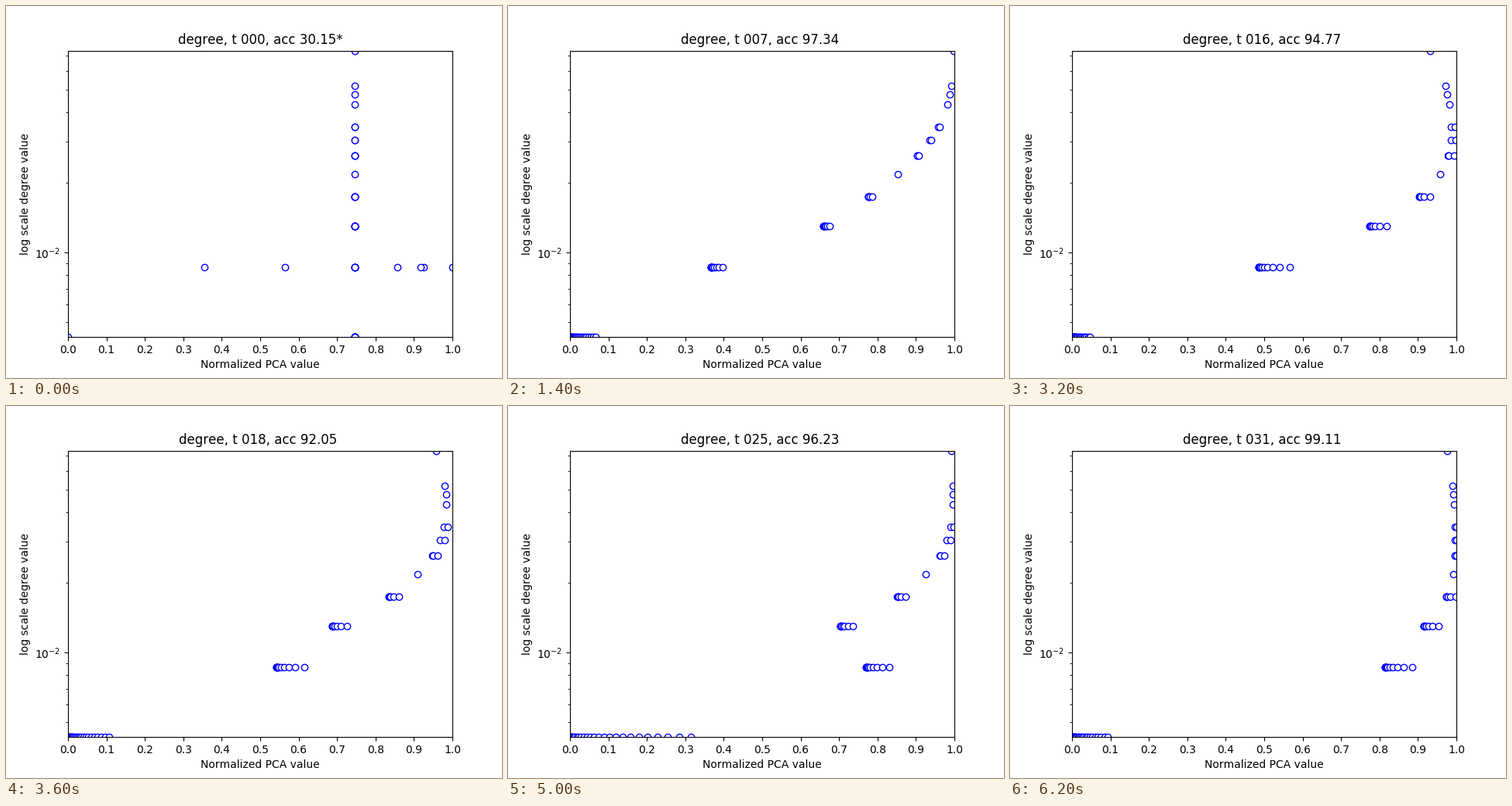
Recreate the animation shown at these times as a matplotlib script. Size 640 px wide and 480 px high, loop 6400 ms.

```python
from collections import namedtuple

import matplotlib.pyplot as plt
import numpy as np
from matplotlib.animation import FuncAnimation

FRAMES = 32
INTERVAL = 200
NODES = 232
MAX_DEGREE = 17
START = 0.745
START_OUTLIERS = [.354, .565, .857, 1.0, .926, .917]

# How many nodes to draw for each degree.
COUNTS = {1: 30, 2: 12, 3: 9, 4: 6, 5: 1, 6: 3, 7: 2, 8: 2,
          10: 1, 11: 1, 12: 1, 17: 1}

# pair: where degree 2 sits; gap: distance of degree 3 from the right edge,
# shrinking by `decay` per degree; fold: how far the hubs bend back;
# spread and leaf: width of the inner rows and of the degree 1 row.
Pose = namedtuple("Pose", "epoch accuracy pair gap decay fold spread leaf")
POSES = [
    Pose(7, 97.34, .367, .340, .66, 0, .03, .067),
    Pose(12, 95.63, .444, .171, .44, .032, .08, .052),
    Pose(16, 94.77, .486, .224, .42, .069, .08, .046),
    Pose(21, 87.96, .627, .445, .60, 0, .06, .198),
    Pose(25, 96.23, .771, .296, .50, .008, .06, .315),
    Pose(31, 99.11, .815, .085, .30, .024, .07, .093),
]
EPOCHS = [0] + [p.epoch for p in POSES]
ACCURACY = [30.15] + [p.accuracy for p in POSES]

degrees = np.repeat(list(COUNTS), list(COUNTS.values()))
rank = np.concatenate([np.linspace(0, 1, n) for n in COUNTS.values()])


def place(pose):
    """Each row is dense at its left end and thins out to the right."""
    hubs = (1 - pose.gap * pose.decay ** (degrees - 3.0)
            - pose.fold * (degrees / MAX_DEGREE) ** 2.5)
    base = np.select([degrees == 1, degrees == 2], [0, pose.pair], hubs)
    inner = pose.spread * (2 / degrees) ** 1.5 * rank ** 4
    tail = np.where(degrees == 1, pose.leaf * rank ** 3, inner)
    return np.minimum(base + tail, 1)


def starting_positions():
    x = np.full(len(degrees), START)
    x[0] = 0
    x[np.flatnonzero(degrees == 2)[-len(START_OUTLIERS):]] = START_OUTLIERS
    return x


positions = np.array([starting_positions()] + [place(p) for p in POSES])

plt.rcParams["text.kerning_factor"] = 6
fig, ax = plt.subplots(figsize=(6.4, 4.8), dpi=100)
ax.set_yscale("log")
ax.set_xlim(0, 1)
ax.set_ylim(1 / (NODES - 1), MAX_DEGREE / (NODES - 1))
ax.set_xticks(np.linspace(0, 1, 11))
ax.set_xlabel("Normalized PCA value")
ax.set_ylabel("log scale degree value")
title = ax.set_title("")
points, = ax.plot([], [], "o", markerfacecolor="white", markeredgecolor="blue")


def training_time(epoch):
    """Progress is fastest in the first epochs."""
    first = EPOCHS[1]
    if epoch >= first:
        return epoch
    return first * (1 - (1 - epoch / first) ** 2)


def update(epoch):
    t = training_time(epoch)
    x = [np.interp(t, EPOCHS, track) for track in positions.T]
    points.set_data(x, degrees / (NODES - 1))
    accuracy = np.interp(t, EPOCHS, ACCURACY)
    mark = "*" if epoch == 0 else " "
    title.set_text(f"degree, t {epoch:03d}, acc {accuracy:.2f}{mark}")
    return points, title


animation = FuncAnimation(fig, update, frames=FRAMES, interval=INTERVAL,
                          repeat=True, repeat_delay=0)
plt.show()
```
